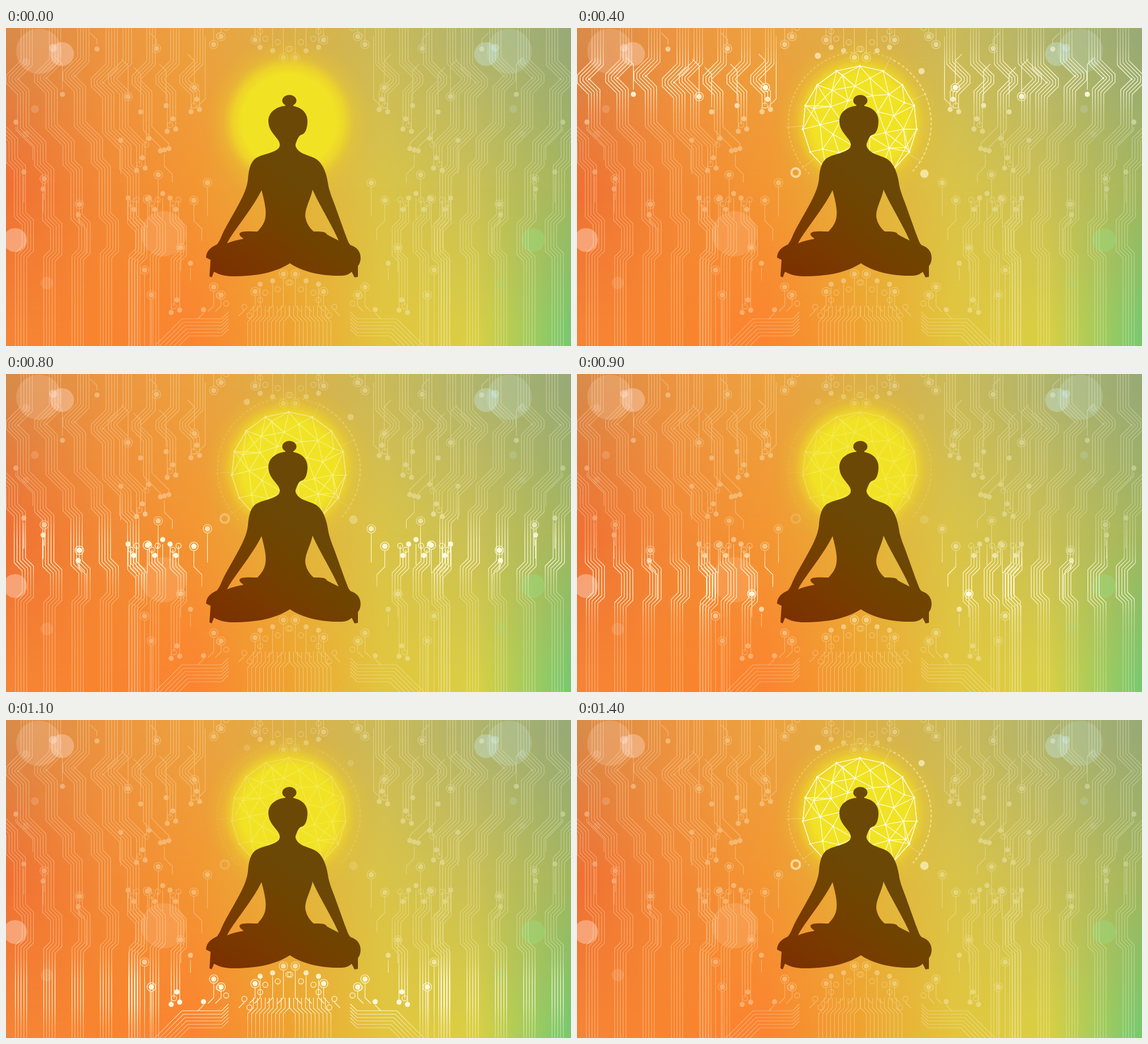
Write an HTML page with a canvas that moves like this. It is 997x561 px and loops after 1500 ms.

```html
<!DOCTYPE html>
<html lang="en">
<head>
<meta charset="utf-8">
<title>Meditation</title>
<style>
html, body { margin: 0; width: 100%; height: 100%; overflow: hidden; background: #e5a83c; }
canvas { display: block; width: 997px; height: 561px; }
</style>
</head>
<body>
<canvas id="stage" width="997" height="561"></canvas>
<script>
const W = 997, H = 561, LOOP = 1500, STEP = 100, TAU = Math.PI * 2;
const stage = document.getElementById('stage').getContext('2d');

let seed = 11;
const random = () => (seed = seed * 16807 % 2147483647) / 2147483647;

function layer(draw) {
  const c = document.createElement('canvas');
  c.width = W; c.height = H;
  draw(c.getContext('2d'));
  return c;
}

// Fills a gradient with evenly spaced colours
function spread(gradient, colors) {
  colors.forEach((c, i) => gradient.addColorStop(i / (colors.length - 1), c));
  return gradient;
}

function disc(g, x, y, r) {
  g.beginPath();
  g.arc(x, y, r, 0, TAU);
  g.fill();
}

function ring(g, x, y, r) {
  g.beginPath();
  g.arc(x, y, r, 0, TAU);
  g.stroke();
}

function line(g, ...points) {
  g.beginPath();
  for (const [x, y] of points) g.lineTo(x, y);
  g.stroke();
}

// Backdrop: three horizontal ramps blended down the stage
function strip(colors, from, to) {
  return layer(g => {
    g.fillStyle = spread(g.createLinearGradient(0, 0, W, 0), colors.split(' '));
    g.fillRect(0, 0, W, H);
    if (to === undefined) return;
    g.globalCompositeOperation = 'destination-in';
    g.fillStyle = spread(g.createLinearGradient(0, from, 0, to), ['transparent', '#000']);
    g.fillRect(0, 0, W, H);
  });
}

// x, y, radius, opacity; each has a cool twin on the right
const bokeh = [
  [58, 41, 40, .2], [99, 46, 21, .38], [83, 35, 7, .45], [35, 60, 7, .18],
  [51, 143, 7, .2], [35, 187, 6, .13], [16, 374, 21, .42], [72, 450, 11, .16]
];

const backdrop = layer(g => {
  g.drawImage(strip('#d98a49 #ec9440 #eda13e #dcb047 #cbba58 #b0b46c #98aa76'), 0, 0);
  g.drawImage(strip('#ef7033 #f28836 #f39632 #e6b238 #d9c448 #c9bf56 #a2b65e', 20, 280), 0, 0);
  g.drawImage(strip('#f58436 #f8842e #fb8431 #efa230 #e2c53e #d9cf44 #78c870', 280, 540), 0, 0);
  for (const [x, y, r, a] of bokeh) {
    g.fillStyle = `rgba(255,222,208,${a})`;
    disc(g, x, y, r);
    g.fillStyle = y < 200 ? `rgba(200,232,228,${a})` : `rgba(150,220,130,${a})`;
    disc(g, 946 - x, y, r);
  }
  g.fillStyle = 'rgba(255,205,170,.22)';
  disc(g, 278, 363, 40);
});

// Circuit: traces share the heights and widths of their 45 degree turns
const turns = [[58, -26], [98, 20], [180, 30], [244, 14], [340, 14], [392, -12]];
const GAP = 5;

function trace(g, x, y, end, inset = 0, shift = 0) {
  const path = [[x, y]];
  for (const [height, dx] of turns) {
    const at = height + shift - Math.sign(dx) * inset * .41, after = at + Math.abs(dx);
    if (at < y || after > end) continue;
    path.push([x, at], [x += dx, after]);
  }
  line(g, ...path, [x, end]);
  return x;
}

function node(g, x, y, open) {
  if (open) ring(g, x, y, 4.6);
  else disc(g, x, y, 4.5);
}

function bus(g, x, y, n, end) {
  const shift = random() * 14 - 7;
  for (let i = 0; i < n; i++) {
    const top = y && y + i * 10 % 27, stop = end < H ? end - i * 11 % 29 : H;
    const last = trace(g, x + i * GAP, top, stop, i * GAP, shift);
    if (top) node(g, x + i * GAP, top, i % 2);
    if (stop < H) node(g, last, stop, i % 3 === 1);
  }
}

const targets = [[265, 36], [332, 105], [215, 121], [67, 266], [268, 259], [355, 273],
  [331, 304], [249, 302], [129, 311], [308, 388], [244, 427], [256, 471]];
const dots = [[160, 37], [99, 117], [282, 137], [237, 148], [17, 166], [202, 198],
  [279, 215], [31, 254], [65, 284], [276, 292], [127, 329], [325, 415]];

function sides(g) {
  for (let x = -24; x < 200; x += 50) bus(g, x, 0, 5, H);
  for (let x = 206; x < 340; x += 42) bus(g, x, 0, 4, 420 - x * .82);
  for (let x = 215; x < 300; x += 37) bus(g, x, 300, 4, Math.min(H, H + (252 - x) * 1.6));
  line(g, [351, 15], [351, 125], [335, 141], [324, 141]);
  for (const [x, y] of [...targets, ...dots]) {
    if (y < 160) line(g, [x, y - 8], [x, y * .55], [x - 12, y * .55 - 12]);
    else trace(g, x, y + 8, y > 420 ? H : y + 30 + random() * 50);
  }
  for (const [x, y] of targets) {
    disc(g, x, y, 4.7);
    ring(g, x, y, 7.5);
  }
  for (const [x, y] of dots) node(g, x, y);
}

// Centre cluster, repeated upside down at the top edge
const heads = [[489, 434], [470, 446], [448, 452], [439, 465], [420, 492], [379, 471], [366, 457], [348, 497]];

function core(g) {
  for (let i = 0; i < 6; i++) {
    const y = 513 + i * 6, x = 262 + i * 8.5, rise = H - y;
    line(g, [x, H], [x + rise, y], [380, y], [392, y - 12]);
  }
  for (let x = 426; x < 496; x += 7) line(g, [x + 10, 490], [x + 10, 508], [x, 518], [x, H]);
  heads.forEach(([x, y], i) => {
    line(g, [x, y + 6], [x, Math.max(y + 6, 490)], [x - 10, Math.max(y + 16, 500)]);
    node(g, x, y, i === 4);
    if (i % 3 === 0 || i === 5) ring(g, x, y, 7.5);
    if (i < 7) node(g, x + 9, y + 15, true);
  });
}

const circuit = layer(g => {
  g.fillStyle = g.strokeStyle = '#fffbe2';
  g.lineWidth = 1.1;
  for (const flip of [1, -1]) {
    seed = 11;
    g.setTransform(flip, 0, 0, 1, flip > 0 ? .5 : 999.5, 0);
    sides(g);
    core(g);
    g.transform(1, 0, 0, -1, 0, 486);
    core(g);
  }
});

const sun = layer(g => {
  const r = g.createRadialGradient(499, 165, 82, 499, 165, 150);
  g.fillStyle = spread(r, ['rgb(241,227,36)', 'rgba(240,220,38,.8)', 'rgba(237,208,42,.32)',
    'rgba(236,206,44,.12)', 'rgba(236,206,44,0)']);
  g.fillRect(340, 0, 320, 330);
});

// Globe: a rim of fifteen points around a spiral of inner ones, linked by nearness
const globe = layer(g => {
  const cx = 499, cy = 168, rim = 15, pts = [];
  const polar = (r, a) => [cx + r * Math.cos(a), cy + r * Math.sin(a)];
  for (let i = 0; i < rim; i++) pts.push(polar(101, i / rim * TAU - TAU / 4));
  for (let i = 3; i < 30; i++) pts.push(polar(17 * Math.sqrt(i), i * 2.4));
  g.fillStyle = g.strokeStyle = '#fffde0';
  g.lineWidth = 1.2;
  pts.forEach(([x, y], i) => {
    disc(g, x, y, 1.9);
    for (const [u, v] of pts.slice(0, i)) {
      if (Math.hypot(x - u, y - v) < 46) line(g, [x, y], [u, v]);
    }
  });
  line(g, ...pts.slice(0, rim), pts[0]);

  const arc = (r, from, to, width, alpha, dash) => {
    g.lineWidth = width;
    g.globalAlpha = alpha;
    g.setLineDash(dash);
    g.beginPath();
    g.arc(cx, cy, r, from * TAU / 360, to * TAU / 360);
    g.stroke();
  };
  arc(126, -62, 42, 2, .55, [5, 4]);
  arc(126, 135, 298, 1.6, .36, [4, 4]);
  arc(116, 165, 330, 1, .25, [1, 2]);
  g.setLineDash([]);
  g.globalAlpha = .38;
  for (const turn of [-65, -24, 32, 142, 177]) {
    const a = turn / 360 * TAU;
    line(g, polar(101, a), polar(130, a));
  }
  g.globalAlpha = .6;
  disc(g, 425, 49, 5.5);
  disc(g, 608, 76, 5.5);
  disc(g, 613, 257, 7.5);
  g.lineWidth = 4;
  ring(g, 386, 255, 7.5);
});

const body = new Path2D(`M498 137 C477 137 463 149 463 164 C463 181 476 190 481 199
  C486 208 482 213 474 217 C462 223 446 224 438 232 C430 240 428 254 427 266
  C425 290 408 315 385 357 C379 369 378 375 372 382 C364 386 354 391 353 405
  L361 409 L359 438 L363 440 L367 430 C378 436 388 438 401 438 C440 438 475 432 501 415
  C524 431 560 438 592 437 C600 437 606 434 610 430 L615 440 L621 439 L621 420
  C628 412 630 390 608 383 C603 378 602 371 598 362 L584 323 C577 302 570 289 568 273
  C565 254 559 242 552 235 C544 226 526 225 517 217 C512 212 509 207 512 202
  C514 196 517 189 522 188 C530 186 532 172 532 164 C532 148 519 137 498 137 Z
  M451 286 C455 303 462 325 456 341 C453 349 448 354 444 359 C432 359 414 357 412 363
  C412 368 417 369 419 372 C408 374 399 376 390 380 C401 358 433 322 451 286 Z
  M541 285 C537 305 525 321 529 337 C531 346 537 354 543 359 C550 359 564 358 566 364
  C572 368 580 371 587 375 C574 345 551 309 541 285 Z`);

const figure = layer(g => {
  g.fillStyle = spread(g.createLinearGradient(370, 430, 500, 250), ['#7b3100', '#793a00', '#704300', '#6b4806']);
  g.fill(body, 'evenodd');
  g.beginPath();
  g.ellipse(500, 128, 12.5, 10, 0, 0, TAU);
  g.rect(493, 132, 14, 8);
  g.fill();
});

// Bright band: the circuit seen through a soft moving window
const lit = layer(() => {});
const lens = lit.getContext('2d');
const clear = 'rgba(0,0,0,0)', faint = 'rgba(0,0,0,.25)';
function light(y) {
  lens.globalCompositeOperation = 'copy';
  lens.drawImage(circuit, 0, 0);
  lens.globalCompositeOperation = 'destination-in';
  lens.fillStyle = spread(lens.createLinearGradient(0, y - 100, 0, y + 100),
    [clear, faint, '#000', '#000', faint, clear]);
  lens.fillRect(0, 0, W, H);
}

function put(image, alpha = 1) {
  stage.globalAlpha = alpha;
  stage.drawImage(image, 0, 0);
}

function frame() {
  const k = Math.floor(performance.now() % LOOP / STEP);
  light(-130 + 55.5 * k);
  put(backdrop);
  put(circuit, .34);
  put(lit, .95);
  put(sun);
  put(globe, Math.min(1, k / 4, Math.abs(k - 10) / 4));
  put(figure);
  requestAnimationFrame(frame);
}
frame();
</script>
</body>
</html>
```
